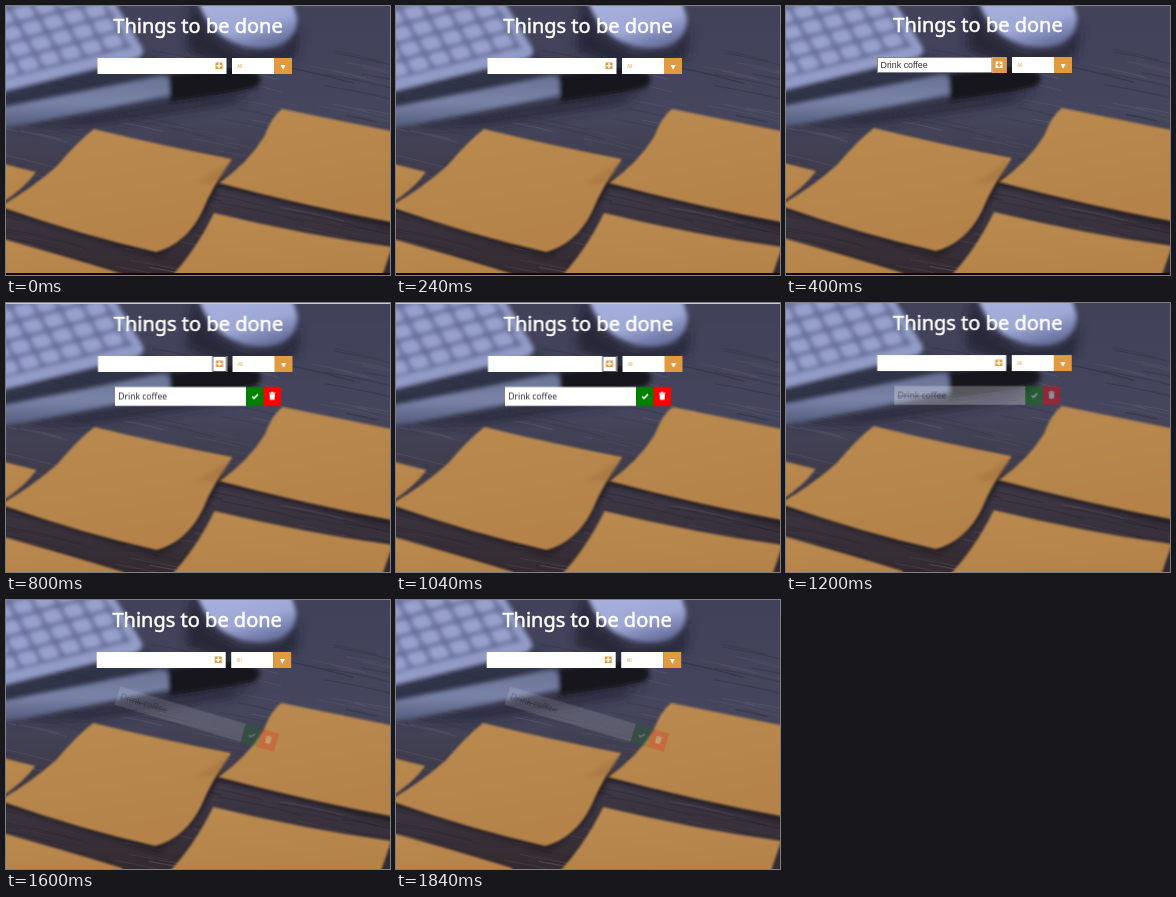
These frames come from a looping animation (384 by 269 pixels, 2 s). An HTML page:

```html
<!DOCTYPE html>
<html lang="en">
<head>
<meta charset="utf-8">
<title>Things to be done</title>
<style>
  html, body { margin: 0; width: 100%; height: 100%; overflow: hidden; background: #39343f; }
  svg { display: block; width: 100%; height: 100%; }
  text { font-family: "Noto Sans", "Open Sans", sans-serif; }
  .title { font-size: 20px; fill: #fff; stroke: #fff; stroke-width: .5px; text-anchor: middle; }
  .entry { font-size: 8.55px; fill: #30303a; }
  .field { font-family: "Liberation Sans", sans-serif; font-size: 8.9px; fill: #30303a; }
  .option { font-size: 4.5px; fill: #e6a046; }
</style>
</head>
<body>
<svg viewBox="0 0 384 269">
  <defs>
    <linearGradient id="desk" x2="0" y2="1">
      <stop offset="0" stop-color="#41425a"/>
      <stop offset=".4" stop-color="#45465d"/>
      <stop offset=".65" stop-color="#3e3a49"/>
      <stop offset="1" stop-color="#33292e"/>
    </linearGradient>
    <linearGradient id="note" x2=".3" y2="1">
      <stop offset="0" stop-color="#b98a50"/>
      <stop offset="1" stop-color="#b5834a"/>
    </linearGradient>
    <linearGradient id="mouse" x2=".6" y2="1">
      <stop offset="0" stop-color="#a9b2de"/>
      <stop offset=".65" stop-color="#9fa8d6"/>
      <stop offset="1" stop-color="#6a73a0"/>
    </linearGradient>
    <linearGradient id="pen" x2="0" y2="1">
      <stop offset="0" stop-color="#687293"/>
      <stop offset=".5" stop-color="#7a84a8"/>
      <stop offset="1" stop-color="#525a7a"/>
    </linearGradient>
    <pattern id="keys" width="21" height="17" patternUnits="userSpaceOnUse"
             patternTransform="matrix(1 -.27 .5 .9 4 2)">
      <rect width="21" height="17" fill="#69729c"/>
      <rect x="1.5" y="1.5" width="17" height="13" rx="4" fill="#98a1cc"/>
    </pattern>
    <filter id="soft" x="-20%" y="-30%" width="140%" height="160%"><feGaussianBlur stdDeviation="2.2"/></filter>
    <filter id="haze" x="-30%" y="-40%" width="160%" height="180%"><feGaussianBlur stdDeviation="5"/></filter>
    <filter id="edge"><feGaussianBlur stdDeviation=".9"/></filter>
    <g id="plus">
      <rect x="209" y="56" width="8" height="7.6" rx="1"/>
      <path d="M213 57.3v5M210.5 59.8h5" stroke-width="1.5"/>
    </g>
  </defs>

  <g id="scene">
    <rect x="-5" y="-5" width="394" height="280" fill="url(#desk)"/>
    <g id="grain" fill="none"></g>

    <g filter="url(#haze)">
      <path d="M-5 85 140 49 165 65 95 86-5 106Z" fill="#2a2b40" opacity=".75"/>
      <path d="M186-8 203 27 236 47 278 43 295 20 290 52 225 62 180 45Z" fill="#20212f" opacity=".8"/>
      <path d="M0 122 165 94 253 84 225 99 80 121Z" fill="#252635" opacity=".7"/>
    </g>
    <g filter="url(#soft)">
      <path d="M-8-8H106L137 43Q138 50 130 53L-8 87Z" fill="#929bc6"/>
      <path d="M-8-8H99L126 42-8 75Z" fill="url(#keys)"/>
      <path d="M191-8Q199 18 219 32 244 47 270 40 291 33 291 12L285-8Z" fill="url(#mouse)"/>
      <path d="M-8 102 154 70Q163 69 164 78V89L20 118-8 122Z" fill="url(#pen)"/>
      <path d="M163 69 226 61 252 68Q258 76 248 82L225 87 164 96Z" fill="#14151f"/>
    </g>

    <path filter="url(#soft)" fill="#211b22" opacity=".8"
      d="M-5 205 151 252Q183 232 196 211L213 181 389 224V208L210 170 150 240-5 196Z M-5 236 120 272H105L-5 241Z"/>
    <g filter="url(#edge)" fill="url(#note)">
      <path d="M-6 157 30 166Q17 184-6 198Z"/>
      <path d="M88 123Q153 139 226 153 207 179 196 206 180 238 150 246 75 229-2 202V198Q26 182 51 160 72 135 88 123Z"/>
      <path d="M276 103 390 126V217Q299 200 213 177 241 158 258 131 266 110 276 103Z"/>
      <path d="M208 207Q299 229 386 241L374 276H160Q188 248 208 207Z"/>
      <path d="M-6 232Q58 250 117 268V276H-6Z"/>
    </g>
    <path filter="url(#soft)" d="M190 177 224 155 215 175 201 178Z" fill="#96683a" opacity=".35"/>

    <text class="title" x="192" y="26.7">Things to be done</text>

    <rect x="91.5" y="52" width="129" height="16" fill="#fff"/>
    <use href="#plus" fill="#e09b40" stroke="#fff"/>
    <g id="typed">
      <rect x="91.5" y="52.5" width="114.5" height="15" fill="#fff" stroke="#85838a"/>
      <rect x="206.5" y="52" width="14" height="16" fill="#e09b40"/>
      <use href="#plus" fill="#fff" stroke="#e09b40"/>
      <text class="field" x="94.5" y="63.3">Drink coffee</text>
    </g>
    <rect id="focus" x="206.2" y="52.5" width="13.8" height="15" fill="none" stroke="#55535a"/>

    <rect x="226" y="52" width="42" height="16" fill="#fff"/>
    <text class="option" x="231.3" y="61.5">All</text>
    <rect x="268" y="52" width="18" height="16" fill="#e09b40"/>
    <path d="M274.6 59h5L277.1 63.7Z" fill="#fff"/>
  </g>

  <g id="item">
    <rect id="paper" x="-83" y="-9.5" width="131" height="19" fill="#fff"/>
    <text class="entry" x="-79.8" y="3.2">Drink coffee</text>
    <path id="strike" d="M-80 .6H-31" stroke="#30303a" stroke-width=".8"/>
    <rect x="48" y="-9.5" width="17.5" height="19" fill="#008000"/>
    <rect x="65.5" y="-9.5" width="17.5" height="19" fill="#f00"/>
    <path d="M54.2 0 56 1.9 60-2.1" fill="none" stroke="#fff" stroke-width="1.5"/>
    <path d="M71.5-2.8H77L76.6 3.2H71.9ZM71-3.8H77.5V-3H71ZM73-4.4H75.5V-3.6H73Z" fill="#fff"/>
  </g>

  <rect id="topline" width="384" height="1" fill="#c9cbd6"/>
  <rect id="bottomline" y="267" width="384" height="2" fill="#190509"/>
</svg>
<script>
  const LOOP = 2000;
  const byId = id => document.getElementById(id);
  const start = performance.now();

  // Each value holds for an equal share of the loop.
  function hold(id, property, values) {
    const frames = values.map((value, i) => ({
      [property]: value, offset: i / values.length, easing: "step-end"
    }));
    frames.push({ [property]: values.at(-1), offset: 1 });
    byId(id).animate(frames, { duration: LOOP, iterations: Infinity }).startTime = start;
  }

  function drawGrain() {
    let seed = 17;
    const random = () => (seed = (seed * 16807) % 2147483647) / 2147483647;
    let lines = "";
    for (let i = 0; i < 170; i++) {
      const x = random() * 440 - 60, y = 40 + random() * 230;
      const length = 25 + random() * 75;
      const color = random() < .45 ? "#777184" : "#1d1a25";
      lines += `<path d="M${x} ${y}q${length / 2} ${length * .08} ${length} ${length * .22}"
        stroke="${color}" stroke-width="${.5 + random()}" opacity="${.1 + random() * .25}"/>`;
    }
    byId("grain").innerHTML = lines;
  }

  drawGrain();
  hold("scene", "transform", [
    "translate(0px, 0px)", "translate(0px, -1px)", "translate(.5px, 1px)",
    "translate(-.3px, 0px)", "translate(-.8px, 0px)"
  ]);
  hold("typed", "opacity", [0, 1, 0, 0, 0]);
  hold("focus", "opacity", [0, 0, 1, 0, 0]);
  hold("item", "opacity", [0, 0, 1, .4, .2]);
  hold("item", "transform", [
    "translate(192px, 93.5px) rotate(0deg)", "translate(192px, 93.5px) rotate(0deg)",
    "translate(192px, 93.5px) rotate(0deg)", "translate(191.3px, 92.5px) rotate(0deg)",
    "translate(191px, 119.3px) rotate(16.5deg)"
  ]);
  hold("paper", "opacity", [1, 1, 1, .7, .65]);
  hold("strike", "opacity", [0, 0, 0, 1, 1]);
  hold("topline", "opacity", [0, 0, 1, 0, 0]);
  hold("bottomline", "opacity", [1, 1, 0, 0, 0]);
</script>
</body>
</html>
```
